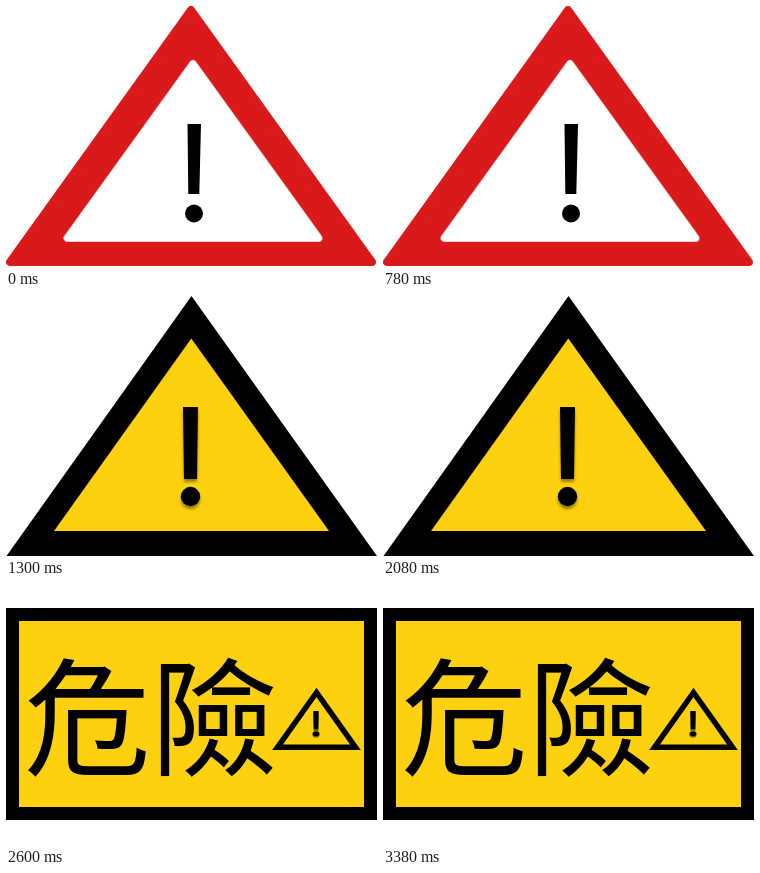
Recreate the animation shown at these times as an HTML page. Size 371 by 261 pixels, loop 3900 ms.

```html
<!DOCTYPE html>
<html lang="zh-Hant">
<head>
<meta charset="utf-8">
<title>Warning signs</title>
<style>
  html, body { margin: 0; width: 100%; height: 100%; overflow: hidden; background: #fff; }
  svg { display: block; width: 371px; height: 261px; }
  .sign { display: none; }
  .sign.on { display: inline; }
  text { font: 400 127px "Noto Sans CJK TC", "Noto Sans CJK HK", "Noto Sans CJK JP", "Noto Sans CJK", sans-serif; }
</style>
</head>
<body>
<svg viewBox="0 0 371 261">
  <defs>
    <filter id="soft" x="-100%" y="-50%" width="300%" height="200%">
      <feGaussianBlur stdDeviation="1.5"/>
    </filter>
    <g id="mark">
      <path d="M177 112H192L191 184H178Z"/>
      <circle cx="184.5" cy="201.5" r="9.7"/>
    </g>
  </defs>

  <g class="sign on">
    <path d="M185 4L4 256H366Z" fill="#da1a1a" stroke="#da1a1a" stroke-width="8" stroke-linejoin="round"/>
    <path d="M187 58L61.5 232H312.5Z" fill="#fff" stroke="#f3c4c4" stroke-width="8" stroke-linejoin="round"/>
    <path d="M187 58L61.5 232H312.5Z" fill="#fff" stroke="#fff" stroke-width="6.5" stroke-linejoin="round"/>
    <path d="M181.5 118H195L193.3 188H182.3Z"/>
    <circle cx="188" cy="207.5" r="9"/>
  </g>

  <g class="sign">
    <path d="M185.5 1L0.5 261H371Z"/>
    <path d="M185.3 43.5L48 236H323Z" fill="#fdd10f"/>
    <use href="#mark" y="3" opacity=".4" filter="url(#soft)"/>
    <use href="#mark"/>
  </g>

  <g class="sign">
    <path d="M0 24H371V236H0Z"/>
    <path d="M13 37H358V223H13Z" fill="#fdd10f"/>
    <text x="18" y="182">危險</text>
    <path d="M310.5 108.5L271.5 163.3H349.5Z" fill="none" stroke="#000" stroke-width="5.5"/>
    <g transform="translate(310 127) scale(.36 .255) translate(-184.5 -112)">
      <use href="#mark" y="6" opacity=".5" filter="url(#soft)"/>
      <use href="#mark"/>
    </g>
  </g>
</svg>
<script>
  const HOLD = 1300;
  const signs = document.querySelectorAll('.sign');

  function draw() {
    const current = Math.floor(performance.now() / HOLD) % signs.length;
    signs.forEach((sign, i) => sign.classList.toggle('on', i === current));
    requestAnimationFrame(draw);
  }
  draw();
</script>
</body>
</html>
```
